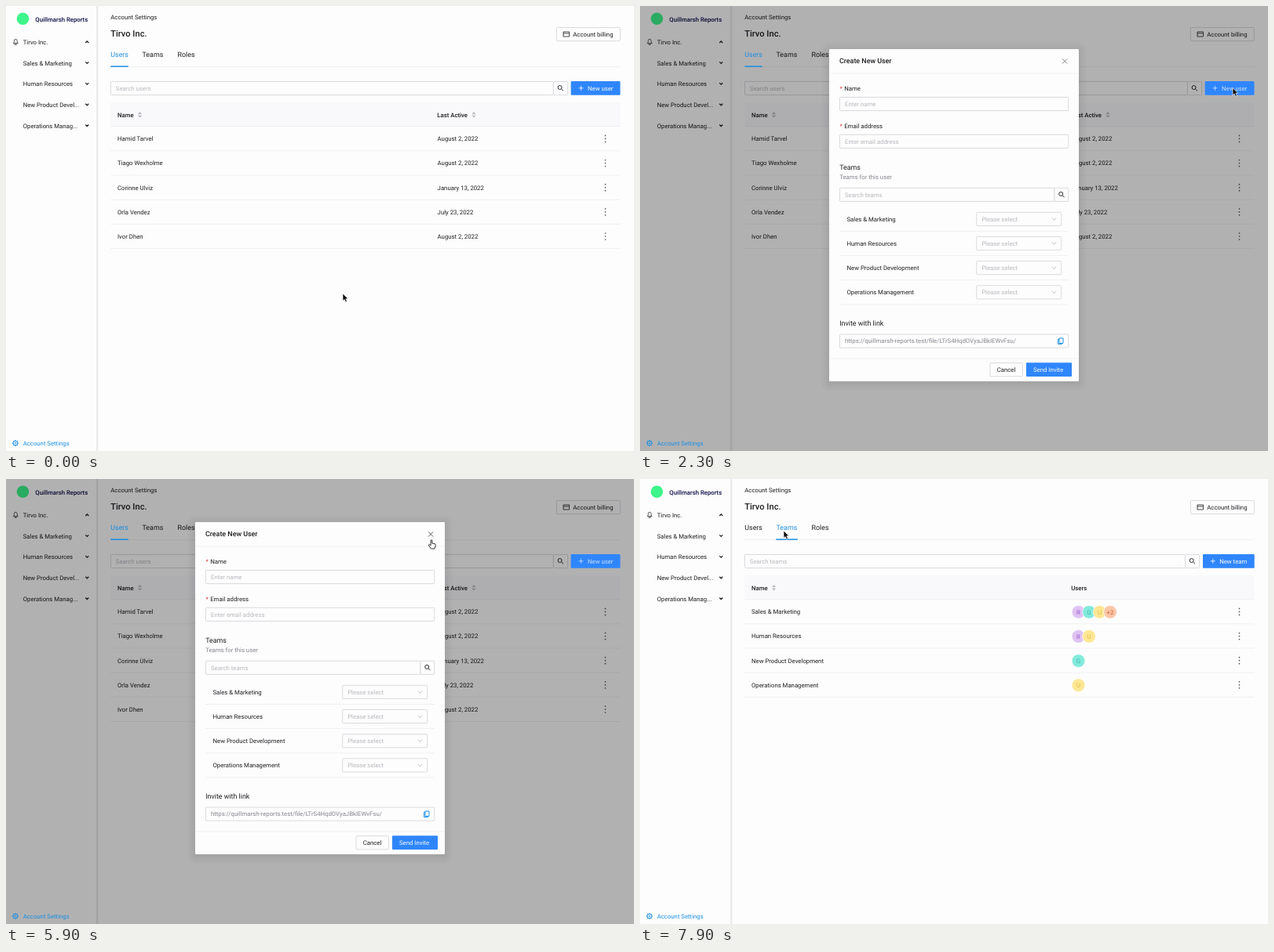
Animation, 800 px wide and 568 px high, one loop 8 s. Source, as an HTML page:

```html
<!DOCTYPE html>
<html lang="en">
<head>
<meta charset="utf-8">
<title>Account settings</title>
<style>
html, body { margin: 0; width: 100%; height: 100%; overflow: hidden; background: #fefdfe; }
svg { display: block; width: 800px; height: 568px; }
text { font: 400 7.78px Roboto, sans-serif; fill: #1d1d1f; text-rendering: geometricPrecision; white-space: pre; }
.m { font-weight: 500; }
.l { font-size: 8.9px; }
.xl { font-size: 11.1px; font-weight: 500; }
.hint { fill: #b7b6ba; }
.grey { fill: #85848a; }
.link { fill: #1a8fe3; }
.white { fill: #fff; }
.red { fill: #e0343c; }
.brand { fill: #0b0b45; }
.mid { text-anchor: middle; }
</style>
</head>
<body>
<svg id="stage" viewBox="0 0 800 568"></svg>
<script>
const LOOP = 8000, STEP = 100;
const OPEN = 2300, CLOSE = 6000, SWAP = 7500;
const BLUE = '#2f86fc', INK = '#1a8fe3', EDGE = '#d6d5d9', RULE = '#efeef1';

const text = (x, y, s, cls = '', id = '') =>
  `<text x="${x}" y="${y}" class="${cls}"${id && ` id="${id}"`}>${s.replace(/&/g, '&amp;')}</text>`;
const rect = (x, y, w, h, fill, extra = '') =>
  `<rect x="${x}" y="${y}" width="${w}" height="${h}" fill="${fill}" ${extra}/>`;
const box = (x, y, w, h, r = 1) => rect(x, y, w, h, '#fefdfe', `stroke="${EDGE}" stroke-width=".9" rx="${r}"`);
const path = (d, stroke, w = 1, extra = 'fill="none"') =>
  `<path d="${d}" stroke="${stroke}" stroke-width="${w}" ${extra}/>`;
const rule = (x, y, w) => rect(x, y - .4, w, .9, RULE);
const group = (id, s) => `<g id="${id}">${s}</g>`;
const chevron = (x, y, up) => {
  const d = up ? -1 : 1;
  return path(`M${x - 2} ${y - d}l2 ${2 * d}l2 ${-2 * d}`, '#222', 1.3);
};
const lens = (x, y) =>
  path(`M${x + 1.2} ${y + 1.2}l2.4 2.4M${x + 1.7} ${y - .8}a2.5 2.5 0 1 1 -5 0a2.5 2.5 0 1 1 5 0`, '#2a2a2c', 1);
const plus = (x, y) => path(`M${x - 3} ${y}h6M${x} ${y - 3}v6`, '#fff', .8);
const dots = y => [-4, 0, 4].map(d => `<circle cx="763.5" cy="${y + d}" r=".85" fill="#555"/>`).join('');
const sorter = x => `<path d="M${x - 2.5} 138l2.5 -3l2.5 3zM${x - 2.5} 139.6l2.5 3l2.5 -3z" fill="#bab9be"/>`;
const rowY = i => 169.4 + 31.15 * i;

// Sidebar and page head
function shell() {
  const items = ['Sales & Marketing', 'Human Resources', 'New Product Devel...', 'Operations Manag...'];
  return rect(0, 0, 800, 568, '#fefdfe') +
    rect(115, 0, 2.4, 568, '#efeef1') + rect(115.6, 0, 1, 568, '#e7e6e9') +
    '<circle cx="21.5" cy="16.3" r="7.8" fill="#3df58b"/>' +
    text(37.3, 19.8, 'Quillmarsh Reports', 'm brand') +
    path('M9.3 47.6h6l-1.1 -1.6v-1.7a1.9 1.9 0 0 0 -3.8 0v1.7zM11.3 47.8v1.6h2v-1.6', '#333', .8) +
    text(21.7, 48.6, 'Tirvo Inc.') + chevron(103.3, 46, true) +
    items.map((s, i) => text(21.7, 75.5 + 26.7 * i, s) + chevron(103.3, 72.4 + 26.7 * i)).join('') +
    text(133.3, 17, 'Account Settings') + text(133.3, 39.4, 'Tirvo Inc.', 'xl') +
    box(701.4, 27.5, 81, 17.2) +
    path('M710 33h7.6v6h-7.6zM710 35h7.6', '#333', .9) + text(722.3, 38.8, 'Account billing') +
    rule(133.3, 77.6, 649.5) +
    text(173.5, 65.2, 'Teams', 'l', 'tabTeams') + text(218.5, 65.2, 'Roles', 'l', 'tabRoles') +
    rect(133.3, 123, 649.5, 30.5, '#f9f8fa') + rule(133.3, 153.6, 649.5) +
    text(142, 141.6, 'Name', 'm') + sorter(170.5);
}

function search(hint, right) {
  return box(133.5, 96.4, right - 133.5, 17.2) + box(right, 96.4, 18.2, 17.2) +
    text(139.8, 107.6, hint, 'hint') + lens(right + 9, 104.8);
}

const row = (i, name, cell) =>
  text(142, rowY(i) + 2.8, name) + cell + dots(rowY(i)) + rule(133.3, rowY(i) + 15.4, 649.5);

function users() {
  const list = [
    ['Hamid Tarvel', 'August 2, 2022'], ['Tiago Wexholme', 'August 2, 2022'],
    ['Corinne Ulviz', 'January 13, 2022'], ['Orla Vendez', 'July 23, 2022'], ['Ivor Dhen', 'August 2, 2022']
  ];
  return search('Search users', 697.4) + text(549.3, 141.6, 'Last Active', 'm') + sorter(596) +
    list.map(([n, d], i) => row(i, n, text(549.6, rowY(i) + 2.8, d))).join('');
}

function teams() {
  const tone = { R: ['#dfc3f3', '#9b5fc9'], G: ['#82eadc', '#45b9ab'], U: ['#ffe794', '#dfb645'], '+2': ['#fac7a8', '#d2602f'] };
  const face = (s, k, y) => {
    const x = 558.5 + 13.5 * k;
    return `<circle cx="${x}" cy="${y}" r="8.4" fill="${tone[s][0]}" stroke="#fefdfe" stroke-width=".7"/>` +
      `<text x="${x}" y="${y + 2.8}" class="mid" style="fill:${tone[s][1]}">${s}</text>`;
  };
  const list = [
    ['Sales & Marketing', ['R', 'G', 'U', '+2']], ['Human Resources', ['R', 'U']],
    ['New Product Development', ['G']], ['Operations Management', ['U']]
  ];
  return search('Search teams', 694.5) + text(549.3, 141.6, 'Users', 'm') +
    list.map(([n, a], i) => row(i, n, a.map((s, k) => face(s, k, rowY(i) + .4)).join(''))).join('');
}

// Blue parts that keep their strength above the dimmed page
function accents() {
  const teeth = Array.from({ length: 8 }, (_, i) => {
    const a = i * Math.PI / 4, c = Math.cos(a), s = Math.sin(a);
    return `M${12 + 2.8 * c} ${558 + 2.8 * s}L${12 + 3.9 * c} ${558 + 3.9 * s}`;
  }).join('');
  return path(teeth, INK, 1.3) + '<circle cx="12" cy="558" r="2.8" fill="none" stroke="#1a8fe3" stroke-width=".8"/>' +
    '<circle cx="12" cy="558" r="1" fill="none" stroke="#1a8fe3" stroke-width=".7"/>' +
    text(21.7, 560.8, 'Account Settings', 'link') +
    text(133.3, 65.2, 'Users', 'l', 'tabUsers') +
    rect(133.3, 76.4, 22.4, 1.5, INK, 'id="bar"') +
    group('newUser', rect(719.6, 96, 62.9, 17.8, BLUE, 'id="newBg" rx="1"') +
      group('newLabel', plus(732.5, 104.8) + text(741, 107.6, 'New user', 'white'))) +
    group('newTeam', rect(717, 96, 65.7, 17.8, BLUE, 'rx="1"') + plus(729.8, 104.8) + text(738.2, 107.6, 'New team', 'white'));
}

function dialog() {
  const field = (y, label, hint) =>
    text(254.6, y + 3, '*', 'red') + text(260.2, y + 2.8, label) +
    box(254.5, y + 11, 291.2, 17.2) + text(261, y + 22.4, hint, 'hint');
  const pick = (s, i) => {
    const y = 271.9 + 31.15 * i;
    return text(263.5, y + 2.8, s) + box(428.7, y - 8.6, 108, 17.2) + text(435.2, y + 2.8, 'Please select', 'hint') +
      path(`M525 ${y - 1.6}l2.6 3.2l2.6 -3.2`, '#b7b6ba', .8) + rule(254.5, y + 15.5, 291.2);
  };
  const shade = [10, 7, 4, 2].map(d =>
    rect(241 - d, 57 - d, 318 + 2 * d, 424 + 2 * d, '#000', `opacity=".018" rx="${d}"`)).join('');
  return shade + rect(241, 55, 318, 424, '#fefdfe', 'rx="1"') +
    text(254, 73.4, 'Create New User', 'm l') + rule(241, 86, 318) +
    path('M538 67.4l6.2 6.2M544.2 67.4l-6.2 6.2', '#77767a', .9, 'fill="none" id="cross"') +
    field(105.4, 'Name', 'Enter name') + field(153.2, 'Email address', 'Enter email address') +
    text(254.2, 208.8, 'Teams', 'l') + text(254.2, 221.4, 'Teams for this user', 'grey') +
    box(254.5, 232.2, 273.5, 17.2) + box(528, 232.2, 17.7, 17.2) + text(261, 243.5, 'Search teams', 'hint') + lens(537, 240.7) +
    ['Sales & Marketing', 'Human Resources', 'New Product Development', 'Operations Management'].map(pick).join('') +
    text(254.2, 408.4, 'Invite with link', 'l') + box(254.5, 419, 291.2, 17.2) +
    text(261, 430.3, 'https://quillmarsh-reports.test/file/LTrS4HqdOVyaJBkIEWvFsu/', 'grey') +
    path('M534 424h5v6.4h-5zM534 425.4h-1.4v6.2h4.6v-1.2', INK, 1) +
    rule(241, 450, 318) + box(446, 455.6, 41.4, 17.2) + text(454.7, 467, 'Cancel') +
    rect(492, 455.2, 58, 17.8, BLUE, 'rx="1"') + text(501, 467, 'Send Invite', 'white');
}

const pointer = path('M0 0v9.4l2.1 -1.9l1.6 3.4l1.7 -.8l-1.5 -3.3h2.9z', '#fff', .7, 'id="arrow" fill="#0a0a0a"') +
  path('M-.9 .7a.9 .9 0 0 1 1.8 0v3.3l3.3 .8q1.2 .4 1 1.8l-.8 3.4q-.2 1 -1.2 1h-3q-.8 0 -1.2 -.7l-2.3 -3.4q-.6 -1 .3 -1.3q.7 -.2 1.3 .5l.8 .8z',
    '#111', .9, 'id="hand" fill="#fff"');

document.getElementById('stage').innerHTML = shell() + group('users', users()) + group('teams', teams()) +
  group('mask', rect(0, 0, 800, 568, '#000', 'opacity=".3"')) + group('accents', accents()) +
  group('dialog', dialog()) + group('cursor', pointer);

const el = id => document.getElementById(id);
const show = (id, on) => { el(id).style.display = on ? '' : 'none'; };
const tint = (id, on) => { el(id).style.fill = on ? INK : '#1d1d1f'; };

// Pointer stops: time, x, y
const stops = [
  [0, 429, 367], [100, 429, 367], [600, 388, 258], [700, 388, 258],
  [1500, 750, 110], [2200, 755, 104.5], [2500, 755, 104.5],
  [3400, 322, 360], [3700, 315, 366], [3800, 315, 366],
  [4300, 421.5, 290.5], [4800, 534, 86], [5300, 541, 68], [5400, 541, 68],
  [5600, 542, 67], [5800, 542, 67], [5900, 542, 78], [6000, 542, 78],
  [6700, 232, 71], [7200, 183, 66], [8000, 183, 66]
];

// Monotone cubic between stops, so the pointer never overshoots a rest
function along(t, k) {
  const last = stops.length - 1;
  let i = 0;
  while (i < last - 1 && t >= stops[i + 1][0]) i++;
  const rate = j => j < 0 || j >= last ? 0 : (stops[j + 1][k] - stops[j][k]) / (stops[j + 1][0] - stops[j][0]);
  const slope = j => {
    const a = rate(j - 1), b = rate(j);
    return a * b > 0 ? 2 * a * b / (a + b) : 0;
  };
  const [a, b] = [stops[i], stops[i + 1]], h = b[0] - a[0], u = (t - a[0]) / h;
  const s = u * u * (3 - 2 * u);
  return a[k] + (b[k] - a[k]) * s + h * u * (1 - u) * ((1 - u) * slope(i) - u * slope(i + 1));
}

function draw(t) {
  const x = along(t, 1), y = along(t, 2);
  const over = (l, top, r, b) => x >= l && x <= r && y >= top && y <= b;
  const modal = t >= OPEN && t < CLOSE, second = t >= SWAP;
  const onNew = !modal && !second && over(719, 96, 783, 114);
  const onCross = modal && over(528, 55, 559, 86);
  const onTab = (l, r) => !modal && over(l, 48, r, 78);

  show('users', !second);
  show('newUser', !second);
  show('teams', second);
  show('newTeam', second);
  show('mask', modal);
  show('dialog', modal);

  el('newBg').setAttribute('fill', onNew ? '#1c69db' : BLUE);
  el('newLabel').setAttribute('opacity', modal ? .75 : 1);
  el('cross').setAttribute('stroke', onCross ? '#4a494d' : '#77767a');
  tint('tabUsers', !second || onTab(133, 156));
  tint('tabTeams', second || onTab(173, 201));
  tint('tabRoles', onTab(218, 241));

  const p = Math.min(1, Math.max(0, (t - SWAP) / 300)), e = 1 - (1 - p) ** 3;
  el('bar').setAttribute('x', 133.3 + 40 * e);
  el('bar').setAttribute('width', 22.4 + 5.1 * e);

  const hand = onNew || onCross;
  show('hand', hand);
  show('arrow', !hand);
  el('cursor').setAttribute('transform', `translate(${x.toFixed(1)} ${y.toFixed(1)})`);
}

const start = performance.now();
function tick() {
  const t = (performance.now() - start) % LOOP;
  draw(Math.floor(t / STEP) * STEP);
  requestAnimationFrame(tick);
}
tick();
</script>
</body>
</html>
```
